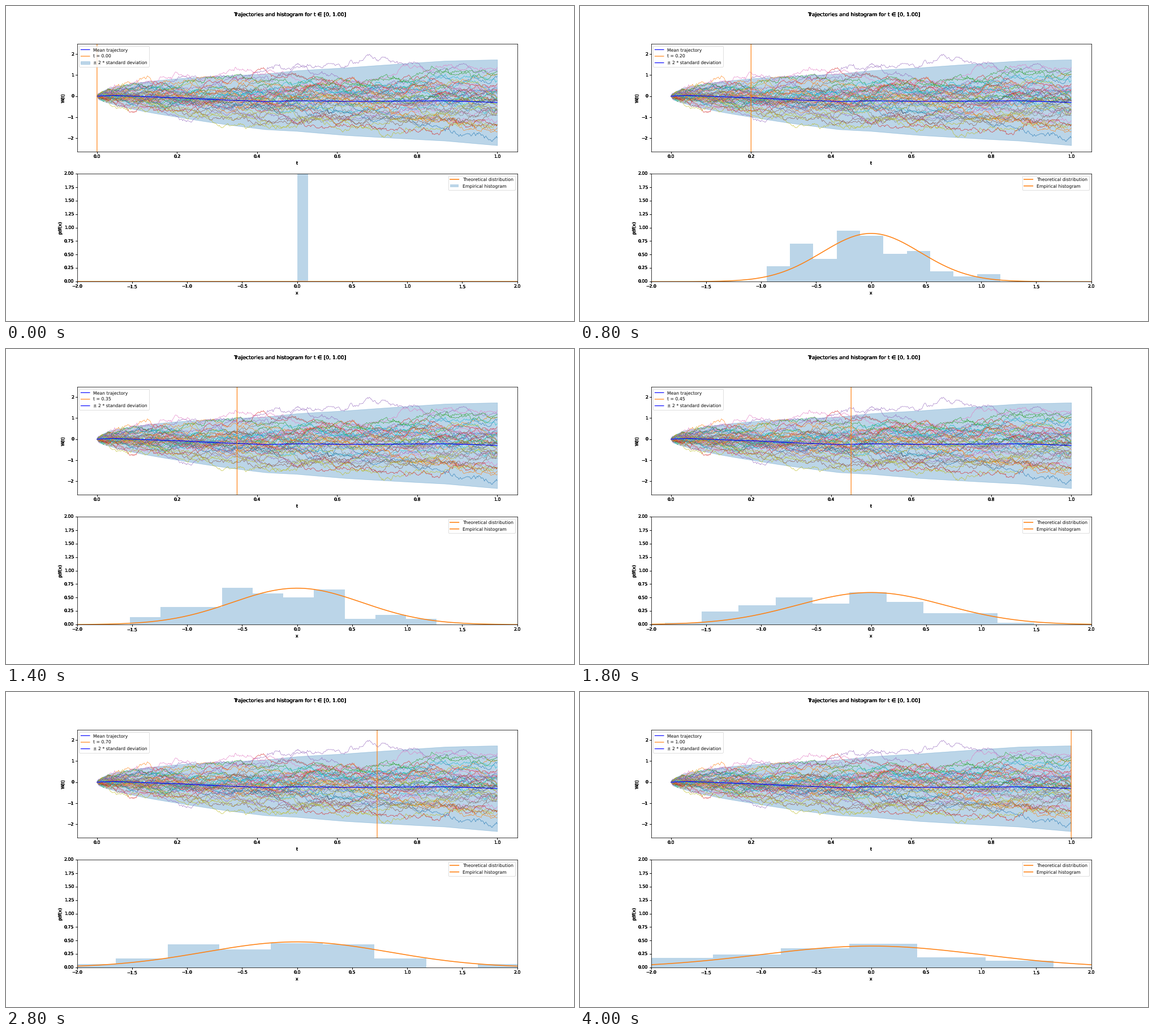
A matplotlib script that plays this animation: 1004x558 px, repeating every 4200 ms.

```python
import numpy as np
import matplotlib.pyplot as plt
from matplotlib.animation import FuncAnimation
from matplotlib.lines import Line2D

plt.rcParams.update({"font.family": "DejaVu Sans", "font.size": 10,
                     "text.hinting": "no_hinting", "axes.linewidth": 1})

STEPS, PATHS, SHOWN, FRAMES = 500, 100, 50, 21
t = np.linspace(0, 1, STEPS + 1)

# Drift of the average walker, as a few key points
DRIFT_T = [0, .04, .2, .3, .42, .5, .62, .87, 1]
DRIFT_X = [0, .03, -.075, -.17, -.26, -.22, -.25, -.22, -.3]


def make_walks(seed=3):
    """Brownian paths whose mean follows the drift and whose spread is ~ sqrt(t)."""
    rng = np.random.default_rng(seed)
    z = rng.normal(size=(PATHS, STEPS)).cumsum(axis=1)
    z = (z - z.mean(axis=0)) / z.std(axis=0)
    z = np.hstack([np.zeros((PATHS, 1)), z])
    return np.interp(t, DRIFT_T, DRIFT_X) + 1.02 * np.sqrt(t) * z


def overprint(artist, times=4):
    """Draw an artist several times so that its soft edges harden."""
    draw = artist.draw
    artist.draw = lambda renderer: [draw(renderer) for _ in range(times)]


def add_legend(ax, handles, labels, loc):
    for line in ax.legend(handles, labels, loc=loc).get_lines():
        line.set_snap(False)


walks = make_walks()
mean, dev = walks.mean(axis=0), walks.std(axis=0)
inside = (walks.min(axis=1) > -2.45) & (walks.max(axis=1) < 2.28)

fig, (top, low) = plt.subplots(2, 1, figsize=(17.9929, 10), dpi=55.8)
fig.subplots_adjust(left=.125, right=.9, bottom=.125, top=.88, hspace=.2)
title = fig.suptitle("Trajectories and histogram for t ∈ [0, 1.00]", fontsize=12)

for i, walk in enumerate(walks[inside][:SHOWN]):
    top.plot(t, walk, color=f"C{i % 10}", lw=.75)
band = top.fill_between(t, mean - 2 * dev, mean + 2 * dev, color="C0", alpha=.3)
mean_line, = top.plot(t, mean, color="blue", lw=1.5)
cursor = top.axvline(0, color="C1", lw=1.5, snap=False)
top.set(xlim=(-.05, 1.05), ylim=(-2.655, 2.49), xlabel="t", ylabel="W(t)",
        xticks=np.arange(0, 1.01, .2), yticks=range(-2, 3))

x = np.linspace(-2, 2, 200)
bars = low.bar(np.zeros(10), np.zeros(10), align="edge", color="C0", alpha=.3)
curve, = low.plot(x, 0 * x, color="C1", lw=2)
low.set(xlim=(-2, 2), ylim=(0, 2), xlabel="x", ylabel="pdf(x)",
        xticks=np.arange(-2, 2.1, .5), yticks=np.arange(0, 2.01, .25))

for artist in (title, top.xaxis, top.yaxis, low.xaxis, low.yaxis):
    overprint(artist)

blue_key = Line2D([], [], color="blue", lw=1.5)
orange_key = Line2D([], [], color="C1", lw=2)


def update(k):
    now = k / (FRAMES - 1)
    first = k == 0
    cursor.set_xdata([now, now])
    add_legend(top, [mean_line, cursor, band if first else blue_key],
               ["Mean trajectory", f"t = {now:.2f}", "± 2 * standard deviation"],
               "upper left")
    add_legend(low, [curve, bars if first else orange_key],
               ["Theoretical distribution", "Empirical histogram"], "upper right")

    sample = walks[:, round(now * STEPS)]
    heights, edges = np.histogram(sample, bins=10, density=True)
    for bar, h, a, b in zip(bars, heights, edges, edges[1:]):
        bar.set(x=a, width=b - a, height=h)

    pdf = 0 * x if first else np.exp(-x ** 2 / (2 * now)) / np.sqrt(2 * np.pi * now)
    curve.set_ydata(pdf)
    return []


anim = FuncAnimation(fig, update, frames=FRAMES, interval=200, repeat=True,
                     repeat_delay=0, blit=False)
plt.show()
```
